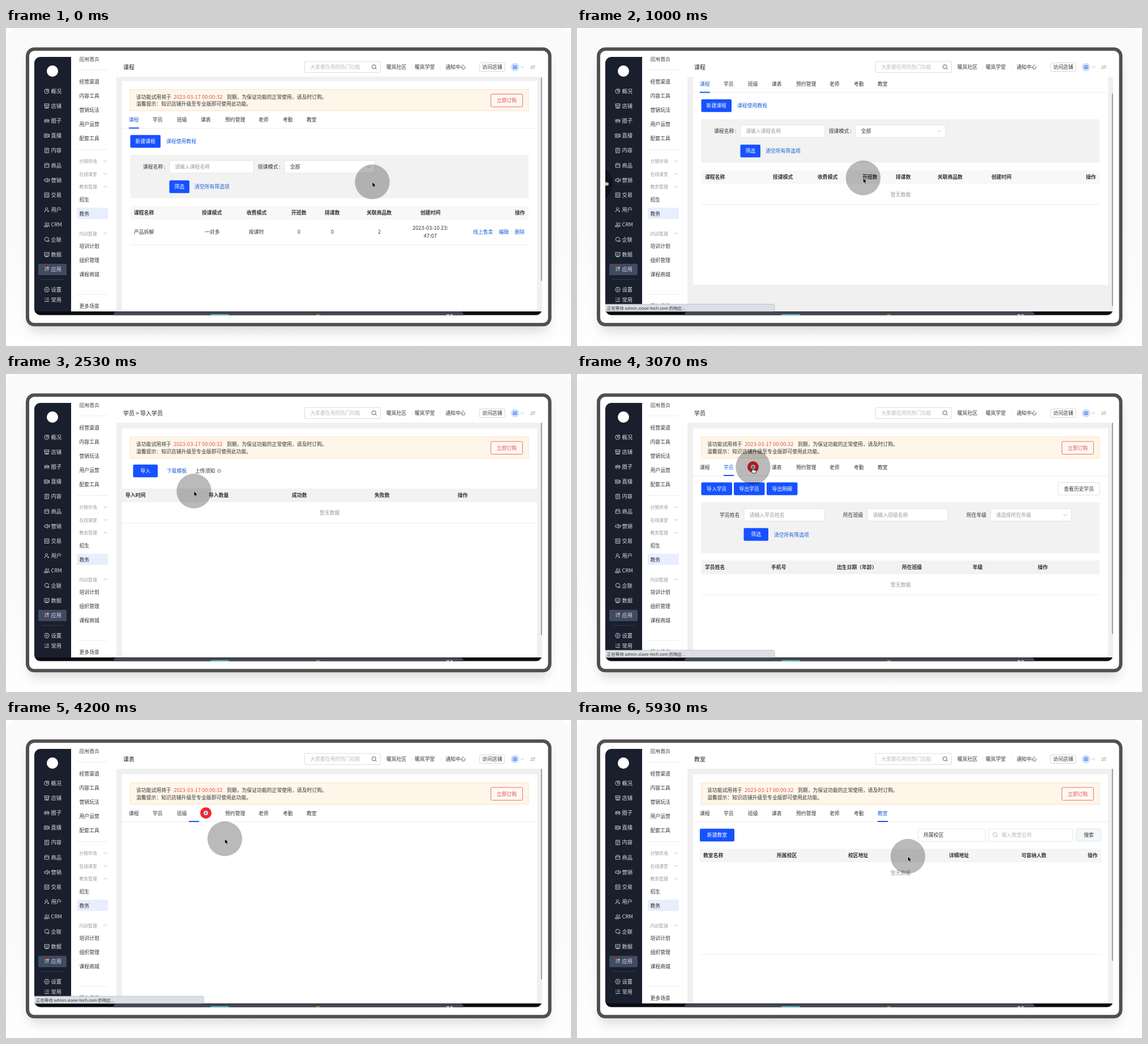
An HTML page for the animation above (6000 ms loop, 998 px wide and 561 px high).

```html
<!DOCTYPE html>
<html lang="zh-CN">
<head>
<meta charset="utf-8">
<title>课程管理</title>
<style>
html, body { margin: 0; width: 100%; height: 100%; overflow: hidden; background: #fff; }
svg { display: block; width: 998px; height: 561px; }
text { font: 8.85px "Noto Sans CJK SC", "Noto Sans CJK", "Noto Sans", sans-serif; fill: #333; white-space: pre; }
.b { font-weight: 700; }
.g { fill: #999; }
.p { fill: #bbb; }
.l { fill: #1a5fdc; }
.w { fill: #fff; }
.r { fill: #e2514c; }
.m { text-anchor: middle; }
.d { font-size: 9.35px; }
.title { font-size: 10px; fill: #222; }
.nav { font-size: 9.3px; fill: #d9dce3; }
.group { font-size: 7.8px; fill: #999; }
.status { font-size: 7.4px; }
.icon { fill: none; stroke: #d9dce3; stroke-width: .9; }
.chev { fill: none; stroke: #aaa; stroke-width: .8; }
</style>
</head>
<body>
<svg id="stage" viewBox="0 0 998 561"></svg>
<script>
const BLUE = '#1652ff', PANEL = '#f2f2f2', LINE = '#e6e8ec';

const text = (x, y, s, cls = '') => `<text x="${x}" y="${y + 3.2}" class="${cls}">${s}</text>`;
const box = (x, y, x2, y2, fill, extra = '') =>
  `<rect x="${x}" y="${y}" width="${x2 - x}" height="${y2 - y}" fill="${fill}" ${extra}/>`;
const rule = (x, x2, y, c = LINE) => box(x, y, x2, y + .8, c);
const chevron = (x, y, up) => `<path class="chev" d="M${x - 3} ${y + (up ? 1.5 : -1.5)}l3 ${up ? -3 : 3}l3 ${up ? 3 : -3}"/>`;
const button = (x, x2, y, s) =>
  box(x, y - 11.3, x2, y + 11.3, BLUE, 'rx="2"') + text((x + x2) / 2, y, s, 'w m');
const field = (x, x2, y, s, cls = 'g') =>
  box(x, y - 11, x2, y + 11, '#fff', 'rx="1.5" stroke="#dcdfe3" stroke-width=".8"') + text(x + 9.7, y, s, cls);
const select = (x, x2, y, s, cls) => field(x, x2, y, s, cls) + chevron(x2 - 11, y);
const lens = (x, y, c) =>
  `<g fill="none" stroke="${c}" stroke-width="1"><circle cx="${x - .7}" cy="${y - .7}" r="3.5"/><path d="M${x + 2} ${y + 2}l2.4 2.4"/></g>`;
const search = (x, y) => text(x, y, '清空所有筛选项', 'l');
const empty = (y, x = 554) => text(x, y, '暂无数据', 'g');

// cols: alternating label and x
const head = (x, x2, y, cols, fill = '#f5f5f5') => {
  let s = box(x, y - 12, x2, y + 12, fill);
  for (let i = 0; i < cols.length; i += 2) s += text(cols[i + 1], y, cols[i], 'b');
  return s;
};

const banner = box(219.5, 111, 923, 148.5, '#fff6ea', 'stroke="#fbddb4" stroke-width=".8"') +
  text(230, 124, '该功能试用将于') + text(296, 124, '2023-03-17 00:00:32', 'r d') +
  text(390, 124, '到期，为保证功能的正常使用，请及时订购。') +
  text(230, 136.5, '温馨提示：知识店铺升级至专业版即可使用此功能。') +
  box(856.5, 119, 912.5, 141.5, '#fff8f2', 'rx="2" stroke="#e8605a" stroke-width=".9"') +
  text(884.5, 130.5, '立即订购', 'r m');

const courseTop = button(219.5, 273, 202.5, '新建课程') + text(283, 202.5, '课程使用教程', 'l') +
  box(219.5, 226.5, 923, 303, PANEL) +
  text(242, 247.5, '课程名称 :') + field(288.5, 437.5, 247.5, '请输入课程名称') +
  text(445, 247.5, '授课模式 :') + select(492, 651, 247.5, '全部', '') +
  button(288.5, 324, 282.5, '筛选') + search(333, 282.5) +
  head(219.5, 923, 328.5, ['课程名称', 226, '授课模式', 346, '收费模式', 425, '开班数', 504,
    '排课数', 563, '关联商品数', 637, '创建时间', 732, '操作', 899], '#f8f8f8');

const courseRow = [['产品拆解', 226], ['一对多', 351], ['按课时', 429], ['0', 515], ['0', 574], ['2', 657]]
  .map(([s, x]) => text(x, 362.5, s)).join('') +
  text(749.5, 355.5, '2023-03-10 23:', 'd m') + text(749.5, 369.5, '47:07', 'd m') +
  text(825, 362.5, '线上售卖', 'l') + text(870.5, 362.5, '编辑', 'l') + text(898.5, 362.5, '删除', 'l') +
  box(865, 358, 865.7, 367, LINE) + box(893, 358, 893.7, 367, LINE) + rule(219.5, 923, 384.5);

const student = button(219.5, 274, 202.5, '导入学员') + button(277, 331.5, 202.5, '导出学员') +
  button(335, 389.5, 202.5, '导出明细') +
  box(850, 191.5, 923, 213.5, '#fff', 'rx="1.5" stroke="#d9d9d9" stroke-width=".8"') +
  text(886.5, 202.5, '查看历史学员', 'm') + box(219.5, 226.5, 923, 316, PANEL) +
  text(252, 248.5, '学员姓名') + field(295, 437, 248.5, '请输入学员姓名') +
  text(470, 248.5, '所在班级') + field(513, 655, 248.5, '请输入班级名称') +
  text(688, 248.5, '所在年级') + select(730.5, 873, 248.5, '请选择所在年级') +
  button(294.5, 338, 283, '筛选') + search(348, 283.5) +
  head(219.5, 923, 341, ['学员姓名', 226, '手机号', 343, '出生日期（年龄）', 459, '所在班级', 574,
    '年级', 699, '操作', 814], '#f2f2f2') + empty(372) + rule(219.5, 923, 389.5);

const importing = button(224.5, 268, 171, '导入') + text(284, 171, '下载模板', 'l') + text(334, 171, '上传须知') +
  '<circle cx="376.5" cy="171" r="3.7" fill="#b9bfc9"/>' + box(376, 169, 377, 173, '#fff') +
  head(205, 938, 214, ['导入时间', 211, '导入数量', 358, '成功数', 505, '失败数', 651, '操作', 798], '#f2f2f2') +
  empty(245) + rule(205, 938, 262.8);

const classes = box(217, 191.5, 272, 218, '#fff', `stroke="${LINE}" stroke-width=".8"`) +
  box(275, 191.5, 329, 217, '#f1f1f1', `stroke="${LINE}" stroke-width=".8"`) +
  rule(272, 926, 217) + text(244.5, 204.5, '一对多', 'l m') + text(302, 204.5, '一对一', 'm') +
  button(217, 278, 241, '新建班级') + text(284, 241, '班级使用教程', 'l') +
  box(217, 264.5, 926, 382, PANEL) +
  text(239, 296, '班级名称 :') + field(283, 442.5, 296, '请输入班级名称') +
  text(469, 296, '关联课程 :') + field(513.5, 673, 296, '输入课程名称') +
  text(699, 296, '排课状态 :') + select(743, 903, 296, '排课状态') +
  text(239, 328.5, '结业状态 :') + select(283, 442.5, 328.5, '结业状态') +
  button(283, 327, 361, '筛选') + search(333, 361) +
  head(217, 926, 407, ['班级名称', 223, '关联课程', 366, '人数/上限', 504, '已上课/排课次数', 579,
    '结业状态', 678, '操', 917]) + empty(438, 561) +
  box(217, 456.5, 926, 462.5, '#e6e6e6') + box(217, 456.5, 911, 462.5, '#b0b0b0', 'rx="1.5"');

const teacher = box(217, 191.5, 926, 281, PANEL) +
  text(249, 213.5, '搜索老师') + field(292, 436.5, 213.5, '请输入姓名或手机号') +
  text(469, 213.5, '授课状态') + select(511.5, 656, 213.5, '全部', '') +
  button(292, 335.5, 248.3, '筛选') + search(345, 248.5) +
  head(217, 926, 305.8, ['老师姓名', 223, '手机号', 308, '简介', 389, '上月课时', 514, '本月课时', 598,
    '已上课时', 681, '授课状态', 764, '操作', 848]) + empty(337) + rule(217, 926, 354.5) +
  '<ellipse cx="572" cy="384" rx="10.5" ry="19" fill="#f5f2f2"/>';

const room = button(217, 278, 203, '新建教室') + field(602.5, 721, 203, '所属校区', '') +
  field(727, 876, 203, '') + lens(739, 203, '#b5b5b5') + text(750, 203, '输入教室名称', 'p') +
  box(882, 191.5, 925.5, 213.5, '#f4f7fa', 'rx="1.5" stroke="#dde2e8" stroke-width=".8"') +
  text(904, 203, '搜索', 'm') +
  head(217, 926, 239, ['教室名称', 223, '所属校区', 353, '校区地址', 479, '详细地址', 657,
    '可容纳人数', 785, '操作', 902]) + empty(270) + rule(217, 926, 413.3);

const tabs = [['课程', 217], ['学员', 259], ['班级', 302], ['课表', 344], ['预约管理', 387],
  ['老师', 446], ['考勤', 489], ['教室', 531]];
const tabMid = i => tabs[i][1] + 9;

// from: first step; tab -1 means no tab row
const pages = [
  { from: 0, title: '课程', tab: 0, body: courseTop + courseRow, end: 620, thumb: 359 },
  { from: 12, title: '课程', tab: 0, body: courseTop + empty(359.5) + rule(219.5, 923, 376.7), end: 518.5, thumb: 375 },
  { from: 21, title: '学员', tab: 1, body: student, end: 543.5, thumb: 373 },
  { from: 37, title: '学员 &gt; 导入学员', tab: -1, body: importing, end: 620, thumb: 375 },
  { from: 42, title: '学员', tab: 1, body: student, end: 543.5, thumb: 373 },
  { from: 48, title: '班级', tab: 2, body: classes, end: 620, thumb: 341 },
  { from: 61, title: '课表', tab: 3, body: '', end: 620, thumb: 372 },
  { from: 73, title: '老师列表', tab: 5, body: teacher, end: 620, thumb: 372 },
  { from: 79, title: '考勤', tab: 6, body: '', end: 620, thumb: 372 },
  { from: 83, title: '教室', tab: 7, body: room, end: 620, thumb: 339 }
];

const scrollKeys = [[0, 2.5], [2, 2.5], [11, 65.5], [21, 65.5], [25, 49.5], [29, 0], [48, 0],
  [53, 65.5], [55, 65.5], [60, 0], [90, 0]];
const cursorKeys = [[0, 647, 271.5], [2, 647, 271.5], [15, 505.5, 264.5], [20, 268, 99], [25, 582.5, 265.5],
  [34, 247, 202], [36, 247, 202], [38, 332, 206.5], [42, 340, 213], [46, 311, 164], [48, 311, 164],
  [53, 484, 273], [55, 484, 273], [60, 353, 164], [66, 420, 255], [72, 458, 166], [75, 499.5, 173.5],
  [78, 498, 166], [82, 541, 166], [89, 584.5, 240.5], [90, 584.5, 240.5]];
const clicks = [[20, 268, 99], [34, 247, 202], [46, 311, 164], [60, 353, 164], [72, 458, 166],
  [78, 498, 166], [82, 541, 166]];
const waits = [[12, 20], [32, 37], [46, 48], [59, 64], [72, 77]];

const navIcons = [
  'M-.5-3.8a4 4 0 1 0 4.3 4.3H-.5zM1.5-4a4 4 0 0 1 2.5 2.5H1.5z',
  'M-4-1V-3.7H4V-1zM-3.2-1V3.8H3.2V-1M-1 3.8V1.5H1V3.8',
  'M0-3a1.6 1.6 0 1 0 .1 0M-3-2a1 1 0 1 0 .1 0M3-2a1 1 0 1 0 .1 0M-2.5 4a2.5 3 0 0 1 5 0M-4.6 2.5a2 2 0 0 1 2-2M4.6 2.5a2 2 0 0 0-2-2',
  'M-4.3-3H2V3H-4.3zM2-1L4.5-2.5V2.5L2 1M-2-1.4V1.4L0 0z',
  'M-3.3-4H3.3V4H-3.3zM-1.5-2H1.5M-1.5 0H1.5M-1.5 2H.5',
  'M-3.8-.8L-2.8-3.5H2.8L3.8-.8V3.5H-3.8zM-3.8-.8H3.8',
  'M-4-1.6H-2L1-3.7V3.7L-2 1.6H-4zM2.5-2a3 3 0 0 1 0 4M4-3a5 5 0 0 1 0 6',
  'M-3.8-3.8H3.8V3.8H-3.8zM-1.7 2V-1.5M1.7-2V1.5M-1.7-1.5H0M1.7 1.5H0',
  'M-.5-4a2 2 0 1 0 .1 0M-4 4a4 4 0 0 1 4-3.7M1 2.2H4M2.5 .7V3.7',
  'M-1-3.8a1.8 1.8 0 1 0 .1 0M2-3.5a1.7 1.7 0 0 1 0 3.4M-4.2 3.5V1.5H2V3.5zM3 1.5H4.4V3.5',
  'M2 3H-.5a3.6 3.6 0 1 1 4-3.5M1 1a1.6 1.6 0 1 0 2-.5L4 3.7',
  'M-4-3.5H4V2.5H-4zM-2.5 .5L-.8-1L.8 .2L2.5-1.5M-3 4H3'];
const navNames = ['概况', '店铺', '圈子', '直播', '内容', '商品', '营销', '交易', '用户', 'CRM', '企联', '数据'];
const icon = (x, y, d) => `<path class="icon" transform="translate(${x} ${y})" d="${d}"/>`;

const sidebar = box(50, 51, 115, 500, '#1a1f2d') + '<circle cx="82" cy="76" r="10" fill="#fff"/>' +
  navNames.map((s, i) => icon(72, 111.3 + i * 26.2, navIcons[i]) + text(79.5, 111.3 + i * 26.2, s, 'nav')).join('') +
  box(57, 416, 107, 436, '#414a63', 'rx="2"') + text(79.5, 426, '应用', 'nav w') +
  ['#f2554b', '#f8b62c', '#35b56a', '#3f82f7'].map((c, i) =>
    `<circle cx="${70 + i % 2 * 4}" cy="${423 + (i >> 1) * 4}" r="1.9" fill="${c}"/>`).join('') +
  rule(62, 102, 443, '#3b4150') +
  icon(72, 461.5, 'M-2.2-4H2.2L4.4 0L2.2 4H-2.2L-4.4 0zM0-1.5a1.5 1.5 0 1 0 .1 0') + text(79.5, 461.5, '设置', 'nav') +
  icon(72, 479.5, 'M-4-3H-2.5M-1-3H4M-4 0H-2.5M-1 0H4M-4 3H4') + text(79.5, 479.5, '常用', 'nav');

const menuRows = [['应用首页', 55], ['经营渠道', 94.5], ['内容工具', 119.5], ['营销玩法', 144.5], ['用户运营', 169.5],
  ['配套工具', 194.5], ['招生', 302.5], ['教务', 327.5], ['培训计划', 385], ['组织管理', 410], ['课程商城', 435], ['更多场景', 490.5]];
const groups = [['分销市场', 235], ['在线课堂', 257.3], ['教务管理', 280, 1], ['内训管理', 362.3, 1]];
const menu = box(115, 51, 195, 500, '#fff') + box(125, 317, 180, 337, '#e8eefd', 'rx="1.5"') +
  menuRows.map(([s, y]) => text(129.5, y, s)).join('') +
  groups.map(([s, y, up]) => text(129.5, y, s, 'group') + chevron(175.5, y, up)).join('') +
  [73.5, 214, 469.5].map(y => rule(125, 180, y)).join('');

const header = box(195, 51, 947, 86, '#fff') +
  box(527.5, 59, 661.5, 78.5, '#fff', 'rx="1.5" stroke="#d4d4d4" stroke-width=".8"') +
  text(537.5, 69, '大家都在用的热门功能', 'p') + lens(650.5, 69, '#555') +
  text(672, 69, '暖岚社区') + text(722, 69, '暖岚学堂') + text(776.5, 69, '通知中心') +
  box(716, 65, 716.7, 73, LINE) + box(767, 65, 767.7, 73, LINE) +
  box(836.5, 61.5, 881, 76.5, '#fff', 'rx="2" stroke="#ccc" stroke-width=".8"') + text(858.8, 69, '访问店铺', 'm') +
  '<circle cx="899" cy="69" r="7.5" fill="#d3e2fc"/>' + box(895.3, 65.8, 902.7, 72.3, '#6f9df5', 'rx="1"') +
  rule(895.3, 902.7, 68, '#d3e2fc') + chevron(912, 69) +
  '<path d="M926.5 67.5h8l-2-2M934.5 70.5h-8l2 2" fill="none" stroke="#888" stroke-width=".8"/>';

const dock = box(50, 500, 947, 507, '#0a0c13') + box(190, 500.5, 808, 515, '#424752', 'rx="5"') +
  box(361, 505, 394, 507, '#62d3da', 'rx="2"') + box(548, 505.3, 554, 507, '#d8b743') +
  box(778, 505, 783, 507, '#d5d7db') + box(785, 505, 789, 507, '#d5d7db');

const $ = id => document.getElementById(id);
$('stage').innerHTML = `<defs>
  <linearGradient id="bg" x2="0" y2="1"><stop offset=".6" stop-color="#fafafa"/><stop offset="1" stop-color="#fff"/></linearGradient>
  <filter id="shade" x="-10%" y="-10%" width="120%" height="130%"><feGaussianBlur stdDeviation="10"/></filter>
  <clipPath id="screen"><rect x="50" y="51" width="897" height="455.5" rx="11"/></clipPath>
  <clipPath id="view"><rect x="195" y="86" width="752" height="414"/></clipPath></defs>` +
  box(0, 0, 998, 600, 'url(#bg)', 'rx="20"') +
  box(40, 50, 958, 536, '#000', 'rx="14" opacity=".13" filter="url(#shade)"') +
  box(38, 37.3, 960.5, 523.3, '#fff', 'rx="12" stroke="#505050" stroke-width="6"') +
  `<g clip-path="url(#screen)">${box(50, 51, 947, 507, '#fff')}${dock}${sidebar}${menu}
  <g clip-path="url(#view)">${box(195, 86, 947, 500, '#f0f0f0')}<g id="scroll">` +
  box(205, 96, 938, 620, '#fff', 'id="card"') + banner +
  `<g id="tabs">${rule(205, 938, 179)}${tabs.map(([s, x]) => text(x, 164.5, s, 'tab')).join('')}
  ${box(0, 178, 18, 180, BLUE, 'id="bar"')}</g>` +
  pages.map((p, i) => `<g id="page${i}">${p.body}</g>`).join('') +
  `</g>${box(944.8, 86, 947, 100, '#a3a3a3', 'rx="1" id="thumb"')}</g>${header}
  <text id="title" class="title" x="207" y="73.1"></text>
  <g id="swipe"><circle cx="30" cy="275" r="33" fill="#10131c"/>${box(46, 272.3, 56, 278, '#b9bcc2', 'rx="2.8"')}</g>
  <g id="status">${box(46, 487.3, 349, 500, '#dce0e6', 'rx="2" stroke="#b4b8be" stroke-width=".8"')}
  ${text(53, 493.8, '正在等待 admin.xiaoe-tech.com 的响应...', 'status')}</g>
  <g id="click"><circle r="10" fill="#f4222b"/><circle r="4" fill="#d5daf0"/><circle r="1.8" fill="#7583bd"/></g>
  <g id="cursor"><circle r="30.7" fill="#000" opacity=".27"/>
  <path id="arrow" d="M0 0V9.2L2.1 7.3L3.6 10.6L5.2 9.9L3.8 6.7H6.5z" stroke="#fff" stroke-width=".6"/>
  <path id="hand" d="M-1.5 1q1-1 1.8 0V5L4 5.7q1.8.4 1.4 2.4L4.8 11H-.5L-3.5 7q0-1.5 2 0z" fill="#fff" stroke="#111" stroke-width=".9"/></g></g>`;

const tabEls = [...document.querySelectorAll('.tab')];
const show = (id, on) => $(id).setAttribute('display', on ? 'inline' : 'none');
const move = (id, x, y) => $(id).setAttribute('transform', `translate(${x} ${y})`);
const ease = u => u * u * (3 - 2 * u);

function at(keys, n) {
  const i = Math.max(1, keys.findIndex(k => k[0] >= n));
  const [a, b] = [keys[i - 1], keys[i]];
  const u = ease((n - a[0]) / (b[0] - a[0]));
  return a.slice(1).map((v, j) => v + (b[j + 1] - v) * u);
}

function draw(n) {
  const cur = pages.findLastIndex(p => n >= p.from);
  const page = pages[cur];
  const [scroll] = at(scrollKeys, n);
  const [x, y] = at(cursorKeys, n);
  const onTabs = y > 155 && y < 183 && page.tab >= 0;

  pages.forEach((p, i) => show('page' + i, i === cur));
  $('title').innerHTML = page.title;
  $('card').setAttribute('height', page.end - 96);
  move('scroll', 0, -scroll);
  $('thumb').setAttribute('y', 86 + scroll * .45);
  $('thumb').setAttribute('height', page.thumb);

  show('tabs', page.tab >= 0);
  if (page.tab >= 0) {
    const last = cur && pages[cur - 1].tab >= 0 ? pages[cur - 1].tab : page.tab;
    const u = ease(Math.min(1, (n - page.from) / 4));
    const mid = i => i === 4 ? 404.5 : tabMid(i);
    $('bar').setAttribute('x', mid(last) + (mid(page.tab) - mid(last)) * u - 9);
    tabEls.forEach((el, i) => {
      const hover = onTabs && x > tabs[i][1] - 4 && x < tabs[i][1] + tabs[i][0].length * 9 + 4;
      el.classList.toggle('l', i === page.tab || hover);
    });
  }

  show('status', waits.some(([a, b]) => n >= a && n < b));
  show('swipe', n >= 13 && n <= 16);
  move('swipe', -Math.abs(n - 15) * 8, 0);
  const click = clicks.find(c => n >= c[0] && n <= c[0] + 3);
  show('click', click);
  if (click) move('click', click[1], click[2]);
  const hand = onTabs || clicks.some(c => Math.abs(n - c[0]) < 2);
  show('hand', hand);
  show('arrow', !hand);
  move('cursor', x, y);
}

const start = performance.now();
function tick() {
  const t = (performance.now() - start) % 6000;
  draw(Math.floor((t + 3.4) * 15 / 1000) % 90);
  requestAnimationFrame(tick);
}
tick();
</script>
</body>
</html>
```
